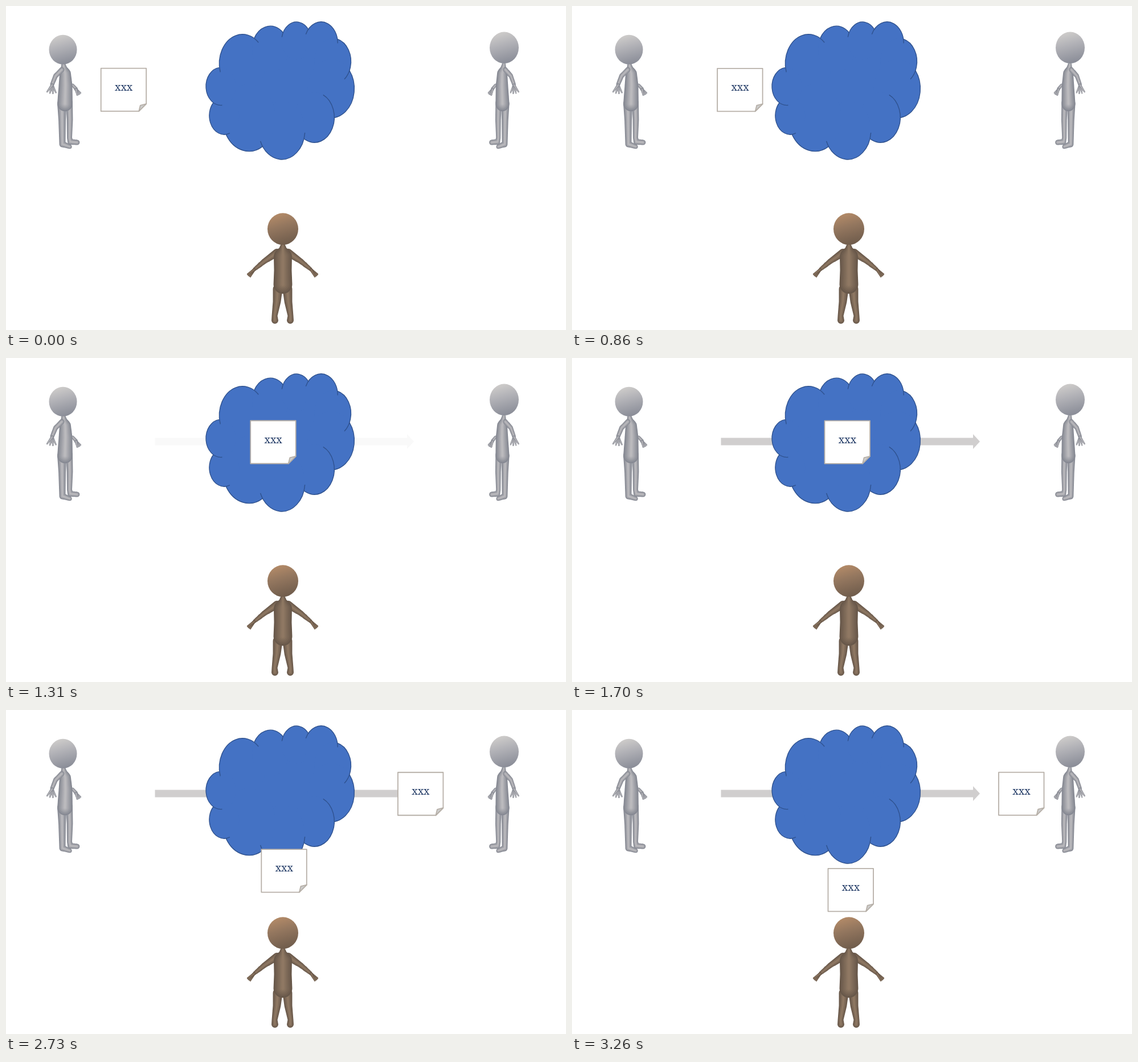
Animation, 983 px wide and 570 px high, one loop 3510 ms. Source, as an HTML page with a canvas:

```html
<!DOCTYPE html>
<html lang="en">
<head>
<meta charset="utf-8">
<title>Message through a cloud</title>
<style>
  html, body { margin: 0; width: 100%; height: 100%; overflow: hidden; background: #fff; }
  canvas { display: block; }
</style>
</head>
<body>
<canvas id="stage" width="983" height="570"></canvas>
<script>
const LOOP = 3510, TRAVEL = 620;
const GREY = { edge: [134, 137, 147], core: [187, 186, 189], head: ['#cfcdcb', '#b2b2b7', '#888b96'] };
const BROWN = { edge: [104, 88, 74], core: [143, 120, 99], head: ['#b48b68', '#94775f', '#6e5b4b'] };

const stage = document.getElementById('stage');
const view = stage.getContext('2d');
const lerp = (a, b, u) => a + (b - a) * u;
const blend = (a, b, u) => a.map((v, i) => lerp(v, b[i], u));
const rad = deg => deg * Math.PI / 180;

function layer(paint) {
  const c = document.createElement('canvas');
  c.width = stage.width;
  c.height = stage.height;
  paint(c.getContext('2d'));
  return c;
}

// Tapered tube through joints [x, y, radius], lighter towards its axis.
function limb(g, tone, ...joints) {
  const shades = 6;
  for (let s = 0; s < shades; s++) {
    const shrink = 1 - s / shades;
    g.fillStyle = `rgb(${blend(tone.edge, tone.core, s / (shades - 1))})`;
    g.beginPath();
    for (let i = 1; i < joints.length; i++) {
      for (let u = 0; u <= 1; u += 0.03) {
        const [x, y, r] = blend(joints[i - 1], joints[i], u);
        g.moveTo(x + r * shrink, y);
        g.arc(x, y, r * shrink, 0, 2 * Math.PI);
      }
    }
    g.fill();
  }
}

// Four fingers fanned around an aim in degrees.
function hand(g, tone, x, y, aim, length, spread) {
  for (let i = -1.5; i <= 1.5; i++) {
    const a = rad(aim + i * spread);
    limb(g, tone, [x, y, 2.5], [x + length * Math.cos(a), y + length * Math.sin(a), 1.2]);
  }
}

function head(g, tone, x, y, rx, ry) {
  const fill = g.createLinearGradient(x - rx * 0.3, y - ry, x + rx * 0.3, y + ry);
  tone.head.forEach((c, i) => fill.addColorStop([0, 0.4, 1][i], c));
  g.fillStyle = fill;
  g.beginPath();
  g.ellipse(x, y, rx, ry, 0, 0, 2 * Math.PI);
  g.fill();
}

// Body in three-quarter view, facing right.
function turnedBody(g) {
  limb(g, GREY, [117, 139, 2.5], [123, 146, 3]);
  hand(g, GREY, 123, 147, 58, 10, 14);
  limb(g, GREY, [111, 170, 6], [112, 200, 5.5], [111.5, 232, 4.5], [113, 239, 5], [125, 240, 4.5]);
  limb(g, GREY, [98, 172, 8], [98.5, 200, 6.5], [99, 243, 5.5], [112, 247.5, 3.8]);
  limb(g, GREY, [100.5, 101, 3], [102, 111, 6], [104, 119, 10], [104.5, 140, 12], [103.5, 172, 13.5]);
  limb(g, GREY, [98, 112, 4.5], [87, 123, 4], [81, 138, 3.5]);
  hand(g, GREY, 81, 139, 95, 15, 21);
}

function people(g) {
  turnedBody(g);
  head(g, GREY, 100, 76.8, 24.5, 26);

  g.save();
  g.translate(964.6, 0);
  g.scale(-0.9, 1);
  turnedBody(g);
  g.restore();
  head(g, GREY, 874.5, 73.3, 25.5, 27.7);

  for (const side of [-1, 1]) {
    const at = (x, y, r) => [485.5 + side * x, y, r];
    limb(g, BROWN, at(8.5, 498, 8.5), at(10, 520, 7), at(14, 545, 5), at(13.5, 553, 6));
    limb(g, BROWN, at(10, 434, 7), at(32, 449, 4.8), at(49, 463, 3));
    hand(g, BROWN, 485.5 + side * 50, 464, 90 - side * 42, 14, 9);
  }
  limb(g, BROWN, [486, 420, 3.5], [486, 431, 8], [486, 441, 16], [486, 465, 15.5], [486, 490, 16.5]);
  head(g, BROWN, 486, 392.3, 27, 28);
}

// Lobes: centre, radius, outlined from and to in degrees, creases included.
const LOBES = [
  [415, 101.3, 40.6, 163, 314], [464, 76, 32.1, 208, 315], [510, 61.5, 26.3, 192, 323],
  [553, 64.9, 29.2, 204, 361], [573.4, 97.6, 32.1, -75, 50], [570.6, 145.2, 40.8, -38, 82],
  [541.5, 196, 34.8, -64, 122], [484.2, 218.4, 40.6, 5, 158], [426.5, 196.5, 46.5, 59, 150],
  [383.1, 192.9, 26.2, 68, 223], [377.2, 141.4, 26.2, 85, 264]
];

function cloud(g) {
  const tall = 1.269;
  const lobe = (x, y, r, from, to) => {
    g.beginPath();
    g.ellipse(x, y, r, r * tall, 0, rad(from), rad(to));
  };
  g.fillStyle = '#4472c4';
  g.strokeStyle = '#2f528f';
  g.lineWidth = 1.4;
  polygon(g, LOBES);
  g.fill();
  for (const [x, y, r] of LOBES) {
    lobe(x, y, r, 0, 360);
    g.fill();
  }
  for (const shape of LOBES) {
    lobe(...shape);
    g.stroke();
  }
}

function polygon(g, points) {
  g.beginPath();
  points.forEach(([x, y]) => g.lineTo(x, y));
  g.closePath();
}

function arrow(g, color) {
  g.fillStyle = color;
  g.fillRect(261.5, 140.5, 443, 13);
  polygon(g, [[704, 134], [716, 147], [704, 160]]);
  g.fill();
}

function note(g, x, y) {
  const w = 79.5, h = 75.5, d = 13;
  g.save();
  g.translate(x, y);
  g.lineJoin = 'round';
  g.strokeStyle = '#b7b0a8';
  g.lineWidth = 1.8;
  polygon(g, [[0, 0], [w, 0], [w, h - d], [w - d, h], [0, h]]);
  g.fillStyle = '#fff';
  g.fill();
  g.stroke();
  polygon(g, [[w - d, h], [w - d * 0.8, h - d * 0.8], [w, h - d]]);
  g.fillStyle = '#cdcdcd';
  g.fill();
  g.stroke();
  g.fillStyle = '#1f3864';
  g.font = '18px "Noto Serif", serif';
  g.textAlign = 'center';
  g.fillText('xxx', w / 2 + 0.2, 39.3);
  g.restore();
}

const cast = layer(people);
const sky = layer(cloud);

// Runs of seven held steps: first and last start.
const RUNS = [[620, 1090], [1170, 1620], [2240, 2730], [2790, 3260]];

function held(t) {
  let time = 0;
  for (const [first, last] of RUNS) {
    for (let i = 0; i < 7; i++) {
      const start = Math.floor(lerp(first, last, i / 6) / 10) * 10;
      if (t >= start) time = start;
    }
  }
  return time;
}

const progress = (t, start) => Math.min(1, Math.max(0, (t - start) / TRAVEL));

function draw(t) {
  const step = held(t);
  const inward = progress(step, 652), outward = progress(step, 2234);
  view.fillStyle = '#fff';
  view.fillRect(0, 0, stage.width, stage.height);
  if (t >= 1090) arrow(view, t < 1700 ? '#f9f9f9' : '#d0cece');
  view.drawImage(sky, 0, 0);
  view.drawImage(cast, 0, 0);
  if (outward > 0) note(view, 443.5 + 6 * outward, 110.3 + 168.5 * outward);
  note(view, 166.7 + 276.8 * inward + 305.5 * outward, 109.7 + 0.6 * inward - 0.7 * outward);
}

const begin = performance.now();
function tick() {
  draw((performance.now() - begin) % LOOP);
  requestAnimationFrame(tick);
}
tick();
</script>
</body>
</html>
```
